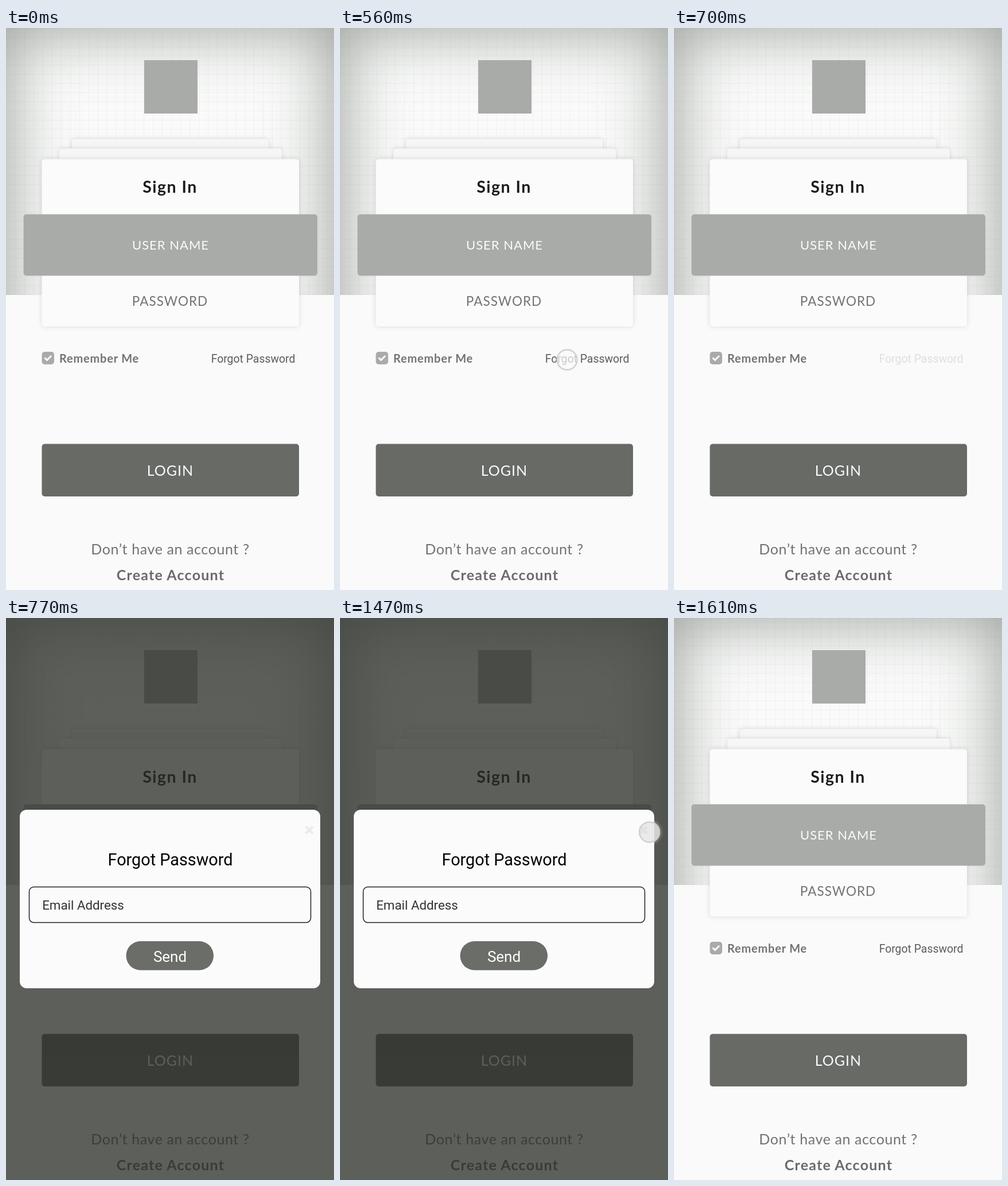
Recreate the animation shown at these times as an HTML page. Size 572 by 979 pixels, loop 1.68 s.

```html
<!DOCTYPE html>
<html lang="en">
<head>
<meta charset="utf-8">
<title>Sign in</title>
<style>
html, body { margin: 0; width: 100%; height: 100%; overflow: hidden; background: #fafafa; }
body { position: relative; }
.header { position: absolute; left: 0; top: 0; width: 572px; height: 465px; overflow: hidden; background: #f9faf9; }
.header::before, .header::after { content: ""; position: absolute; inset: 0 0 -160px; }
.header::before {
  background:
    repeating-linear-gradient(90deg, rgba(150,165,155,.09) 0 1px, transparent 1px 16px),
    repeating-linear-gradient(rgba(150,165,155,.09) 0 1px, transparent 1px 16px);
}
.header::after { box-shadow: inset 0 0 110px 4px rgba(112,118,112,.68); }
svg { position: absolute; left: 0; top: 0; display: block; }
text { font-family: Lato, "Open Sans", sans-serif; fill: #737373; text-anchor: middle; }
.bold { font-weight: 700; }
.rob { font-family: Roboto, Arial, sans-serif; }
.card { fill: #fbfbfb; filter: drop-shadow(0 0 4px rgba(90,95,90,.2)); }
.back { fill: #f5f6f5; }

.link, .tap, .modal, .tap2, .ghost { animation: 1680ms step-end infinite; }
.tap, .modal, .tap2, .ghost { opacity: 0; }
.ring { fill: rgba(250,250,250,.7); stroke: #d0d0d0; stroke-width: 2.4; }
.glow { filter: drop-shadow(0 0 3px rgba(255,255,255,.7)); }

.link { animation-name: press; }
.tap { animation-name: tap; }
.modal { animation-name: modal; }
.tap2 { animation-name: close; }
.ghost { animation-name: ghost; }
@keyframes press { 0% { fill: #5c5c5c; } 37.5% { fill: #dfdfdf; } 91.66%, 100% { fill: #5c5c5c; } }
@keyframes tap { 0% { opacity: 0; } 33.33% { opacity: 1; } 37.5% { opacity: .5; } 41.66%, 100% { opacity: 0; } }
@keyframes modal { 0% { opacity: 0; } 45.83% { opacity: 1; } 91.66%, 100% { opacity: 0; } }
@keyframes close { 0% { opacity: 0; } 87.5% { opacity: 1; } 91.66%, 100% { opacity: 0; } }
@keyframes ghost { 0% { opacity: 0; } 91.66% { opacity: 1; } 95.83%, 100% { opacity: 0; } }
</style>
</head>
<body>
<div class="header"></div>
<svg width="572" height="979" viewBox="0 0 572 979">
  <rect x="241" y="56" width="93" height="93" fill="#a9aba8"/>

  <rect class="card back" x="115" y="193" width="343" height="60" rx="5"/>
  <rect class="card back" x="93" y="210" width="388" height="60" rx="5"/>
  <rect class="card" x="62.5" y="228.5" width="448.5" height="291.5" rx="5"/>
  <text class="bold" x="286" y="287" font-size="28.5" letter-spacing="1.5" style="fill:#1c1c1c">Sign In</text>
  <rect x="30.5" y="324.5" width="512.5" height="107" rx="5" fill="#a9aba8"/>
  <text x="287" y="386" font-size="22" letter-spacing="1" style="fill:#fafafa">USER NAME</text>
  <text x="286" y="484" font-size="22.5" letter-spacing="1">PASSWORD</text>

  <rect x="62.5" y="564" width="21.5" height="22" rx="5" fill="#a9aba8"/>
  <path d="M67.5 574.5l4 4 7.500-7.500" fill="none" stroke="#fff" stroke-width="3"/>
  <text class="bold" x="162.500" y="583" font-size="20" letter-spacing=".8">Remember Me</text>
  <text class="rob link" x="431" y="583" font-size="19.4">Forgot Password</text>

  <rect x="62.5" y="724.5" width="448.5" height="91.500" rx="5" fill="#686a66"/>
  <text x="286.5" y="779.500" font-size="25" letter-spacing="1" style="fill:#fafafa">LOGIN</text>
  <text x="286.5" y="917" font-size="25" letter-spacing=".6">Don’t have an account ?</text>
  <text class="bold" x="287" y="962" font-size="25" letter-spacing="1.2" style="fill:#6a6a6a">Create Account</text>

  <g class="tap"><circle class="ring" cx="396" cy="578" r="17.500"/></g>
  <path class="ghost" d="M543 358a17.500 17.500 0 0 0 0 31z" fill="#adafac"/>

  <g class="modal">
    <rect width="572" height="979" fill="rgb(40,43,38)" fill-opacity=".75"/>
    <rect x="24" y="334" width="524" height="311" rx="12" fill="#fbfbfb"/>
    <path d="M523 363.500l12 12m0-12l-12 12" stroke="#ececec" stroke-width="4.500"/>
    <text class="rob" x="286.5" y="431" font-size="28.800" style="fill:#000">Forgot Password</text>
    <rect x="40.500" y="468.500" width="491" height="62" rx="8" fill="none" stroke="#222" stroke-width="1.500"/>
    <text class="rob" x="134.500" y="508" font-size="22.300" style="fill:#333">Email Address</text>
    <rect x="209.500" y="563" width="152.500" height="50.500" rx="25" fill="#6b6d69"/>
    <text class="rob" x="286" y="598.500" font-size="26" style="fill:#fff">Send</text>
  </g>
  <g class="tap2">
    <path d="M523 363.500l12 12m0-12l-12 12" stroke="#c4c4c4" stroke-width="4.500"/>
    <circle class="ring glow" cx="539.500" cy="373" r="17.500" style="fill:rgba(225,225,225,.7)"/>
  </g>
</svg>
</body>
</html>
```
